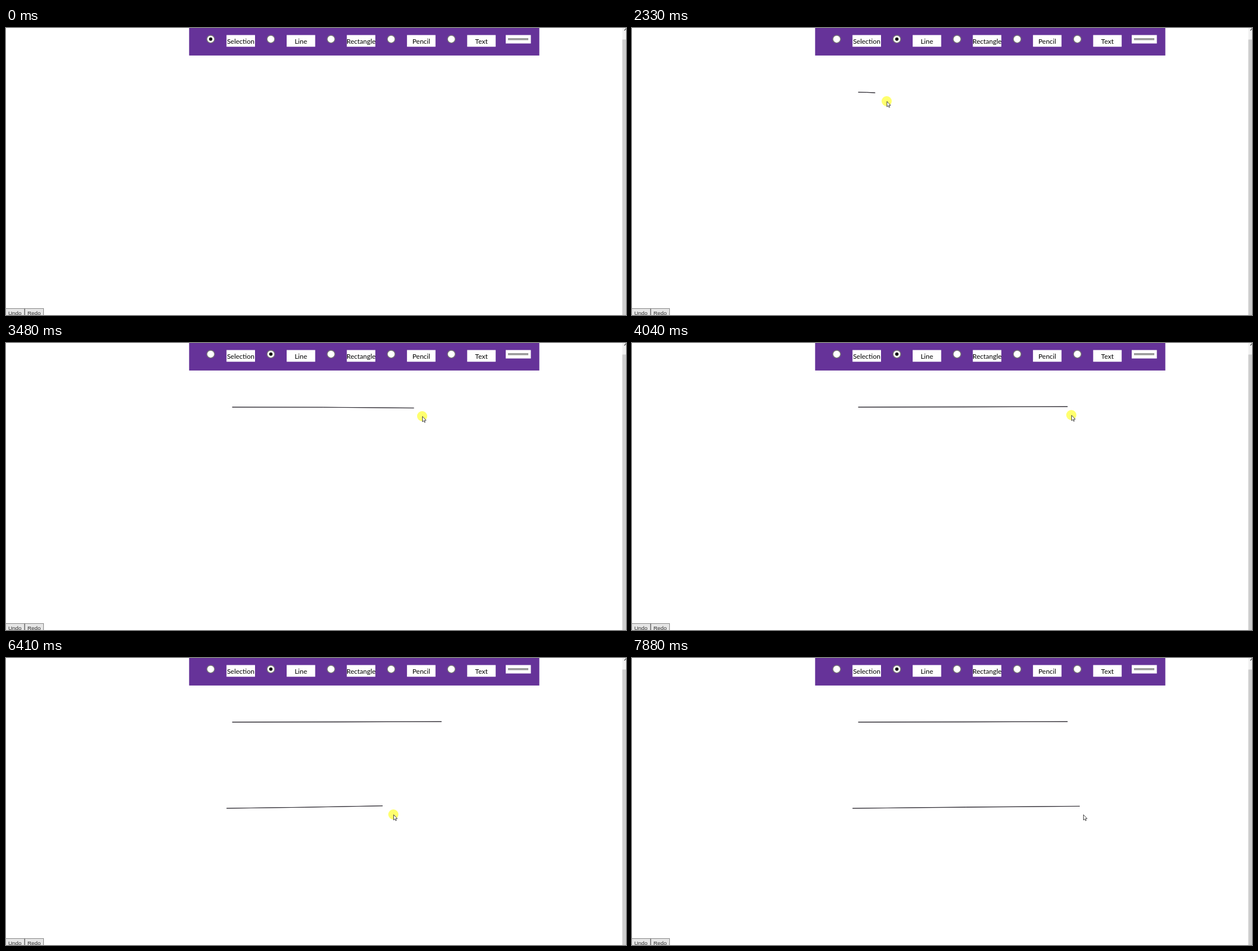
Write an HTML page that moves like this. It is 1098 by 510 pixels and loops after 8 s.

```html
<!DOCTYPE html>
<html lang="en">
<head>
<meta charset="utf-8">
<title>Sketch board</title>
<style>
html, body { margin: 0; width: 100%; height: 100%; overflow: hidden; background: #fff; }
svg { display: block; width: 100vw; height: 100vh; }
.label { font: 12px Lato, "Open Sans", sans-serif; text-anchor: middle; fill: #000; }
.button { font: 9.8px "Liberation Sans", Arial, sans-serif; fill: #333; }
.ink { fill: none; stroke: #2a262e; stroke-width: .9; stroke-linecap: round; }
</style>
</head>
<body>
<svg viewBox="0 0 1098 510">
  <rect x="324.3" width="620.2" height="48.9" fill="#639"/>
  <g id="tools"></g>
  <rect x="885" y="12.5" width="44.5" height="15" fill="#fff"/>
  <rect x="889" y="18" width="36" height="3.6" fill="#999"/>
  <g id="buttons"></g>
  <rect x="1091.5" width="6.5" height="510" fill="#f1f1f1"/>
  <rect x="1091.5" y="20.5" width="6.5" height="489.5" fill="#cdcdcd"/>
  <path d="M1095 4.5L1097.8 1.5L1100.6 4.5" fill="none" stroke="#505050" stroke-width="1.2"/>
  <g id="lines"></g>
  <g id="pointer">
    <circle id="halo" r="9" fill="#ff0" opacity=".57"/>
    <path d="M.5 .5V10L2.6 8L4.1 11.2L5.5 10.6L4.1 7.4H7Z" fill="#fff" stroke="#333" stroke-width=".9"/>
  </g>
</svg>
<script>
const LOOP = 8000, LAG = 60, OFF_X = 6.5, OFF_Y = 14.5;
const $ = id => document.getElementById(id);
const clamp = v => Math.min(1, Math.max(0, v));

function add(parent, tag, attrs, text) {
  const el = document.createElementNS("http://www.w3.org/2000/svg", tag);
  for (const k in attrs) el.setAttribute(k, attrs[k]);
  if (text) el.textContent = text;
  return parent.appendChild(el);
}

function show(el, on) {
  el.setAttribute("visibility", on ? "inherit" : "hidden");
}

const dots = ["Selection", "Line", "Rectangle", "Pencil", "Text"].map((name, i) => {
  const x = 362.5 + i * 106.55, g = $("tools");
  add(g, "circle", { cx: x, cy: 19.8, r: 6.8, fill: "#fff", stroke: "#767676", "stroke-width": 1.4 });
  add(g, "rect", { x: x + 28, y: 12.5, width: 50.5, height: 20.8, fill: "#fff" });
  add(g, "text", { x: x + 53.2, y: 28, class: "label" }, name);
  return add(g, "circle", { cx: x, cy: 19.8, r: 3, fill: "#111" });
});

["Undo", "Redo"].forEach((name, i) => {
  const x = i * 34, g = $("buttons");
  add(g, "rect", { x: x - 0.5, y: 498.5, width: 33, height: 20, fill: "#e6e6e6", stroke: "#858585" });
  add(g, "text", { x: x + 4, y: 509.5, class: "button" }, name);
});

// Pointer stops: [time, x, y]
const stops = [
  [130, 1046, 489], [900, 495, 51], [1240, 468, 18], [1520, 468, 18],
  [1840, 407, 128.5], [2100, 407, 128.5], [2330, 451, 130], [3480, 737, 130],
  [3940, 777.5, 127.5], [4370, 777.5, 127.5], [5060, 398, 281], [5330, 398, 281],
  [5660, 465, 283.5], [6000, 578, 273], [6410, 685.5, 278], [7050, 785, 283],
  [7600, 799, 278], [LOOP, 799, 278]
];

// Pen strokes: start point, and the time of press and release
const lines = [
  { x: 401, y: 114, press: 1980, release: 4370 },
  { x: 391, y: 267, press: 5130, release: 7880 }
];
for (const l of lines) l.el = add($("lines"), "path", { class: "ink" });
const CLICK = { press: 1380, release: 1470 };

const rate = (i, c) => (stops[i + 1][c] - stops[i][c]) / (stops[i + 1][0] - stops[i][0]);

function slope(i, c) {
  if (i === 0 || i === stops.length - 1) return 0;
  const a = rate(i - 1, c), b = rate(i, c);
  return a * b > 0 ? 2 * a * b / (a + b) : 0;
}

// Monotone cubic through the stops
function tip(t) {
  let i = 0;
  while (i < stops.length - 2 && t >= stops[i + 1][0]) i++;
  const p = stops[i], q = stops[i + 1], h = q[0] - p[0];
  const u = clamp((t - p[0]) / h), v = 1 - u;
  return [1, 2].map(c =>
    p[c] * v * v * (1 + 2 * u) + q[c] * u * u * (3 - 2 * u) +
    h * (slope(i, c) * u * v * v - slope(i + 1, c) * u * u * v));
}

function noise(n) {
  const s = Math.sin(n * 12.9898) * 43758.5453;
  return (s - Math.floor(s)) * 2 - 1;
}

// Two slightly bowed strokes; the wobble changes only while the end moves
function sketch(x1, y1, x2, y2) {
  const seed = Math.round(x2 / 15), size = 0.7 * clamp((x2 - x1) / 40);
  return [0, 1].map(i => {
    const bow = size * noise(seed + i * 50), d = 0.3 * noise(seed + i * 90);
    return `M${x1} ${y1 + d}Q${(x1 + x2) / 2} ${(y1 + y2) / 2 + 2 * bow} ${x2} ${y2 - d}`;
  }).join("");
}

const held = (t, { press, release }) => t >= press && t < release;

function draw(t) {
  const picked = t < CLICK.release ? 0 : 1;
  dots.forEach((d, i) => show(d, i === picked));

  for (const l of lines) {
    const [x, y] = tip(Math.min(t, l.release) - LAG);
    show(l.el, t > l.press);
    l.el.setAttribute("d", sketch(l.x, l.y, Math.max(l.x, x - OFF_X), y - OFF_Y));
  }

  const [x, y] = tip(t).map(Math.round);
  show($("halo"), [CLICK, ...lines].some(p => held(t, p)));
  show($("pointer"), t >= stops[0][0]);
  $("pointer").setAttribute("transform", `translate(${x} ${y})`);
}

const start = performance.now();
function loop() {
  draw((performance.now() - start) % LOOP);
  requestAnimationFrame(loop);
}
loop();
</script>
</body>
</html>
```
